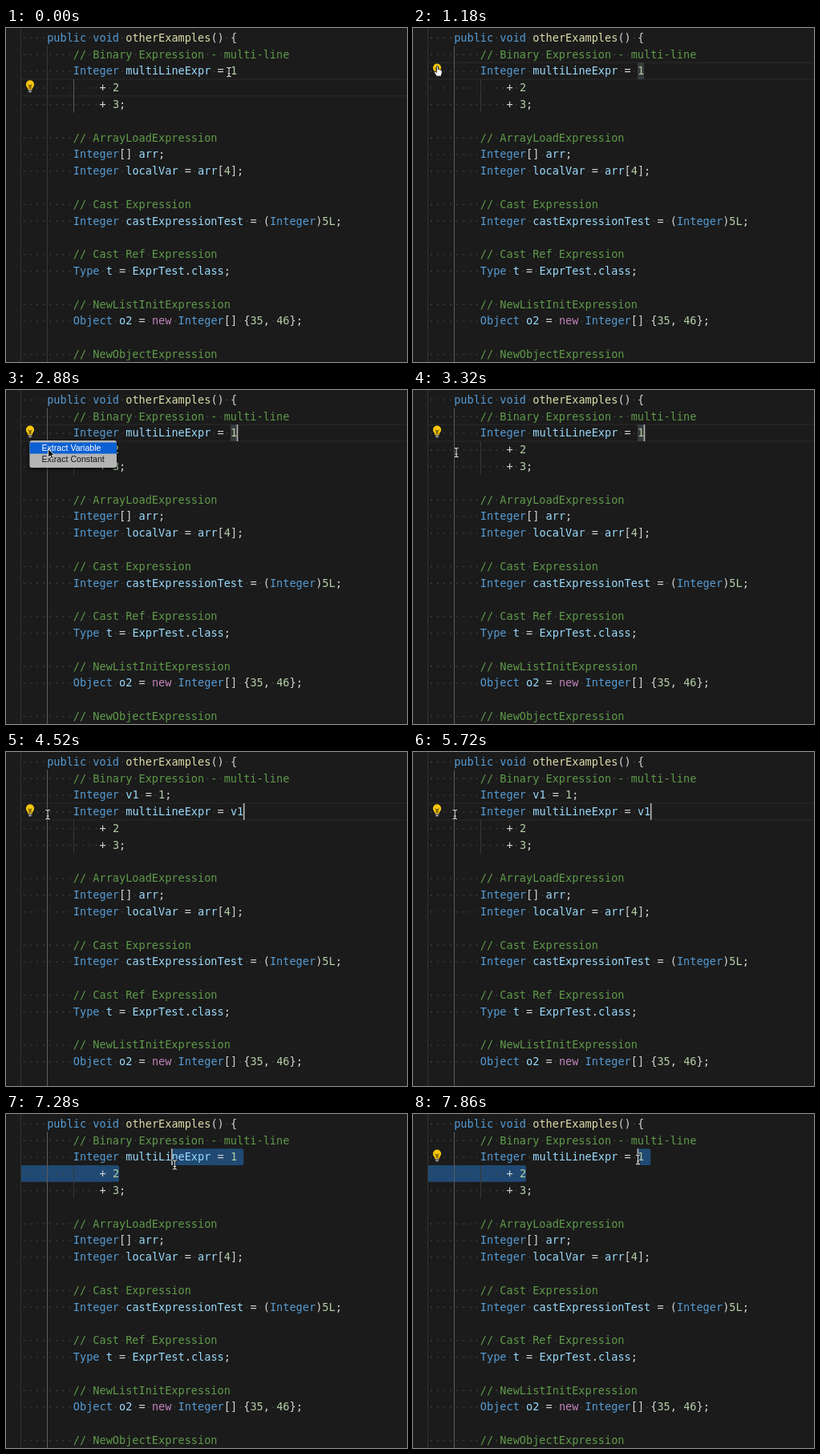
Write an HTML page that moves like this. It is 500x417 px and loops after 8000 ms.

```html
<!DOCTYPE html>
<html lang="en">
<head>
<meta charset="utf-8">
<title>Extract variable in a code editor</title>
<style>
  html, body { margin: 0; width: 100%; height: 100%; overflow: hidden; background: #1b1b1b; }
  svg { display: block; width: 500px; height: 417px; }
  .code { font: 13.57px "DejaVu Sans Mono", monospace; white-space: pre; }
  .item { font: 10.6px "Liberation Sans", Arial, sans-serif; }
  .comment { fill: #5f9a4a; }
  .type { fill: #559bd4; }
  .new { fill: #c283bd; }
  .num { fill: #b5cea8; }
  .fn { fill: #dcdcaa; }
  .name { fill: #9adafc; }
  .punct { fill: #d4d4d4; }
  .dots { fill: #434343; }
</style>
</head>
<body>
<svg id="stage" viewBox="0 0 500 417">
  <defs>
    <filter id="shadow" x="-20%" y="-30%" width="140%" height="190%">
      <feDropShadow dx="0" dy="2" stdDeviation="2.5" flood-opacity=".6"/>
    </filter>
  </defs>
  <rect width="500" height="417" fill="#1b1b1b"/>
  <g id="back"></g>
  <g id="docs"></g>
  <g id="front"></g>

  <g id="bulb">
    <path d="M-2.6 4.2C-2.6 2-5.1 1-5.1-2.2A5.1 5.1 0 0 1 5.1-2.2C5.1 1 2.6 2 2.6 4.2Z" fill="#fbc70a"/>
    <path d="M-2.3-2.2L-.9-.6V3.4M2.3-2.2L.9-.6V3.4M-1-.6H1" fill="none" stroke="#4a3c08" stroke-width="1"/>
    <path d="M-2.3 5.2H2.3M-1.6 7H1.6" stroke="#c9c9c9" stroke-width="1.1"/>
  </g>

  <g id="menu">
    <rect x="29.5" y="63" width="108.5" height="34" rx="3" fill="#b4b4b4" filter="url(#shadow)"/>
    <rect id="hover" x="29.5" width="108.5" height="14" fill="#0b60d3"/>
    <text class="item" x="44.5" y="76.2">Extract Variable</text>
    <text class="item" x="44.5" y="90.2">Extract Constant</text>
  </g>

  <g id="mouse">
    <g id="beam" fill="none" stroke-linecap="round">
      <path id="beamPath" d="M-2.3-5.6Q0-5.6 0-4V4Q0 5.6-2.3 5.6M2.3-5.6Q0-5.6 0-4M0 4Q0 5.6 2.3 5.6M-1.3 2H1.3" stroke="#0b0b0b" stroke-width="2.6"/>
      <use href="#beamPath" id="beamLight"/>
      <path d="M-2.3-5.6Q0-5.6 0-4V4Q0 5.6-2.3 5.6M2.3-5.6Q0-5.6 0-4M0 4Q0 5.6 2.3 5.6M-1.3 2H1.3" stroke="#dedede" stroke-width="1.1"/>
    </g>
    <path id="arrow" d="M-1.5-1.5V9.6L1-7.2" fill="none"/>
    <path id="pointer" d="M-1.5-1.5V9.4L1.1 7L3 11L5 10.1L3.2 6.2H6.5Z" fill="#080808" stroke="#f4f4f4" stroke-width=".9"/>
    <path id="hand" d="M-1.6-5.2Q-.5-6.2.4-5V-1.3Q1.3-2 2-1Q3-1.5 3.6-.5Q5-.8 5.2.7V3.2L4 7.2H-1.5L-4.6 2.6Q-4.8 1-3 1.4L-1.8 2.6Z" fill="#f6f6f6" stroke="#111" stroke-width=".9"/>
  </g>
</svg>
<script>
const LOOP = 8000, X0 = 18.5, CW = 8.17, TOP = 1.6, LH = 20.8;
const CLICK = 260, MENU_OPEN = 1500, MENU_CLOSE = 3220, EXTRACT = 3480, UNDO = 5760, PRESS = 6700, DRAG = 6860;

const before = [
  "    public void otherExamples() {",
  "        // Binary Expression - multi-line",
  "        Integer multiLineExpr = 1",
  "            + 2",
  "            + 3;",
  "",
  "        // ArrayLoadExpression",
  "        Integer[] arr;",
  "        Integer localVar = arr[4];",
  "",
  "        // Cast Expression",
  "        Integer castExpressionTest = (Integer)5L;",
  "",
  "        // Cast Ref Expression",
  "        Type t = ExprTest.class;",
  "",
  "        // NewListInitExpression",
  "        Object o2 = new Integer[] {35, 46};",
  "",
  "        // NewObjectExpression"
];
const after = [...before];
after.splice(2, 1, "        Integer v1 = 1;", "        Integer multiLineExpr = v1");

const $ = id => document.getElementById(id);
const colX = col => X0 + col * CW;
const rowY = row => TOP + row * LH;

function make(parent, tag, attrs = {}, text = "") {
  const el = document.createElementNS("http://www.w3.org/2000/svg", tag);
  for (const key in attrs) el.setAttribute(key, attrs[key]);
  el.textContent = text;
  return parent.appendChild(el);
}
function set(el, attrs) {
  for (const key in attrs) el.setAttribute(key, attrs[key]);
}
const show = (el, on) => { el.style.display = on ? "" : "none"; };

function kind(word) {
  if (word.startsWith("//")) return "comment";
  if (/^(public|void|Integer|Type|Object)$/.test(word)) return "type";
  if (word === "new") return "new";
  if (word === "otherExamples") return "fn";
  if (/^\d/.test(word)) return "num";
  return /^\w/.test(word) ? "name" : "punct";
}

function buildDoc(lines) {
  const doc = make($("docs"), "g");
  const dots = make(doc, "g", { class: "dots" });
  const guides = { outer: [], inner: [] };
  const guide = (x, y, h) => make(doc, "rect", { x, y, width: 1, height: h, fill: "#333" });
  guide(18, 0, 417);
  guides.outer = guide(51, rowY(1), 417);
  const first = lines.findIndex(line => line.startsWith(" ".repeat(12)));
  guides.inner = guide(84, rowY(first), LH * 2);
  lines.forEach((line, row) => {
    for (const { index } of line.matchAll(/ /g))
      make(dots, "circle", { cx: colX(index + .5), cy: rowY(row) + 10.8, r: .85 });
    for (const { 0: word, index } of line.matchAll(/\/\/.*|\w+|[^\w\s]+/g))
      make(doc, "text", { class: "code " + kind(word), x: colX(index), y: rowY(row) + 15.2 }, word);
  });
  return { doc, guides };
}

const rect = (parent, fill, attrs) => make($(parent), "rect", { fill, ...attrs });
const lineBox = rect("back", "none", { x: 18.5, width: 490, height: LH, stroke: "#2a2a2a" });
const wordBox = rect("back", "#373b3d", { x: colX(32), y: rowY(2), width: CW, height: LH });
const selTop = rect("back", "#204a73", { y: rowY(2), height: LH, rx: 2.5 });
const selLow = rect("back", "#204a73", { x: X0, y: rowY(3), width: colX(15) - X0, height: LH, rx: 2.5 });
const caret = rect("front", "#b4b5b3", { width: 1.6, height: LH });
const docs = [before, after].map(buildDoc);
const items = document.querySelectorAll(".item");
$("beamLight").remove();
$("arrow").remove();

// Each row: time, value held from then on.
const bulbRow = [[0, 3], [CLICK, -1], [520, 2], [EXTRACT, -1], [3560, 3], [UNDO, -1], [6100, 2], [PRESS, -1], [7380, 2]];
const blink = [[0, 0], [CLICK, 1], [860, 0], [1460, 1], [2060, 0], [2660, 1], [3920, 0], [4520, 1], [5120, 0], [5720, 1], [6360, 0], [PRESS, 1]];
const caretSpot = [[0, [3, 15]], [CLICK, [2, 33]], [EXTRACT, [3, 34]], [UNDO, [2, 33]], [PRESS, [3, 15]]];
// Each row: time, x, y.
const path = [
  [0, 278, 55], [380, 278, 55], [1040, 31, 53], [1560, 31, 53], [1960, 56.5, 88],
  [2480, 56.5, 88], [2860, 54, 75], [3220, 54, 75], [3310, 54, 78], [3920, 54, 78],
  [3960, 52, 78], [5700, 52, 78], [6440, 147, 77], [DRAG, 147, 77], [7420, 222, 61], [7850, 280.5, 57]
];

const held = (table, t) => table.filter(row => row[0] <= t).pop()[1];

function mouseAt(t) {
  const next = path.findIndex(row => row[0] > t);
  if (next < 0) return path[path.length - 1].slice(1);
  const [t0, x0, y0] = path[next - 1], [t1, x1, y1] = path[next];
  const u = (t - t0) / (t1 - t0), k = u * u * (3 - 2 * u);
  return [x0 + (x1 - x0) * k, y0 + (y1 - y0) * k];
}

function draw(t) {
  const [mx, my] = mouseAt(t);
  const extracted = t >= EXTRACT && t < UNDO;
  let [row, col] = held(caretSpot, t);
  const selecting = t >= DRAG && my < rowY(3);
  if (selecting) {
    row = 2;
    col = Math.min(33, Math.round((mx - X0) / CW));
  }

  docs.forEach(({ doc, guides }, i) => {
    show(doc, extracted === (i === 1));
    const inner = i === 0 && row === 3;
    set(guides.outer, { fill: inner ? "#383838" : "#5c5c5c" });
    set(guides.inner, { fill: inner ? "#5c5c5c" : "#383838" });
  });

  show(lineBox, !selecting);
  set(lineBox, { y: rowY(row) });
  show(wordBox, t >= 500 && t < EXTRACT);
  show(selTop, selecting);
  show(selLow, selecting);
  if (selecting) set(selTop, { x: colX(col), width: colX(34) - colX(col) });
  show(caret, held(blink, t));
  set(caret, { x: colX(col) - .4, y: rowY(row) });

  const bulb = held(bulbRow, t);
  show($("bulb"), bulb >= 0);
  set($("bulb"), { transform: `translate(30 ${rowY(bulb) + 8.6})` });

  const menuOpen = t >= MENU_OPEN && t < MENU_CLOSE + 80;
  const hover = my >= 79.5 ? 1 : my >= 65 ? 0 : -1;
  show($("menu"), menuOpen);
  set($("menu"), { opacity: Math.min(1, (MENU_CLOSE + 80 - t) / 80) });
  show($("hover"), hover >= 0);
  set($("hover"), { y: 65.5 + 14 * Math.max(0, hover) });
  items.forEach((item, i) => set(item, { fill: i === hover ? "#fff" : "#161616" }));

  const overBulb = !menuOpen && mx < 38;
  set($("mouse"), { transform: `translate(${mx} ${my})` });
  show($("hand"), overBulb);
  show($("pointer"), menuOpen);
  show($("beam"), !overBulb && !menuOpen);
}

const start = performance.now();
function tick() {
  draw((performance.now() - start) % LOOP);
  requestAnimationFrame(tick);
}
tick();
</script>
</body>
</html>
```
